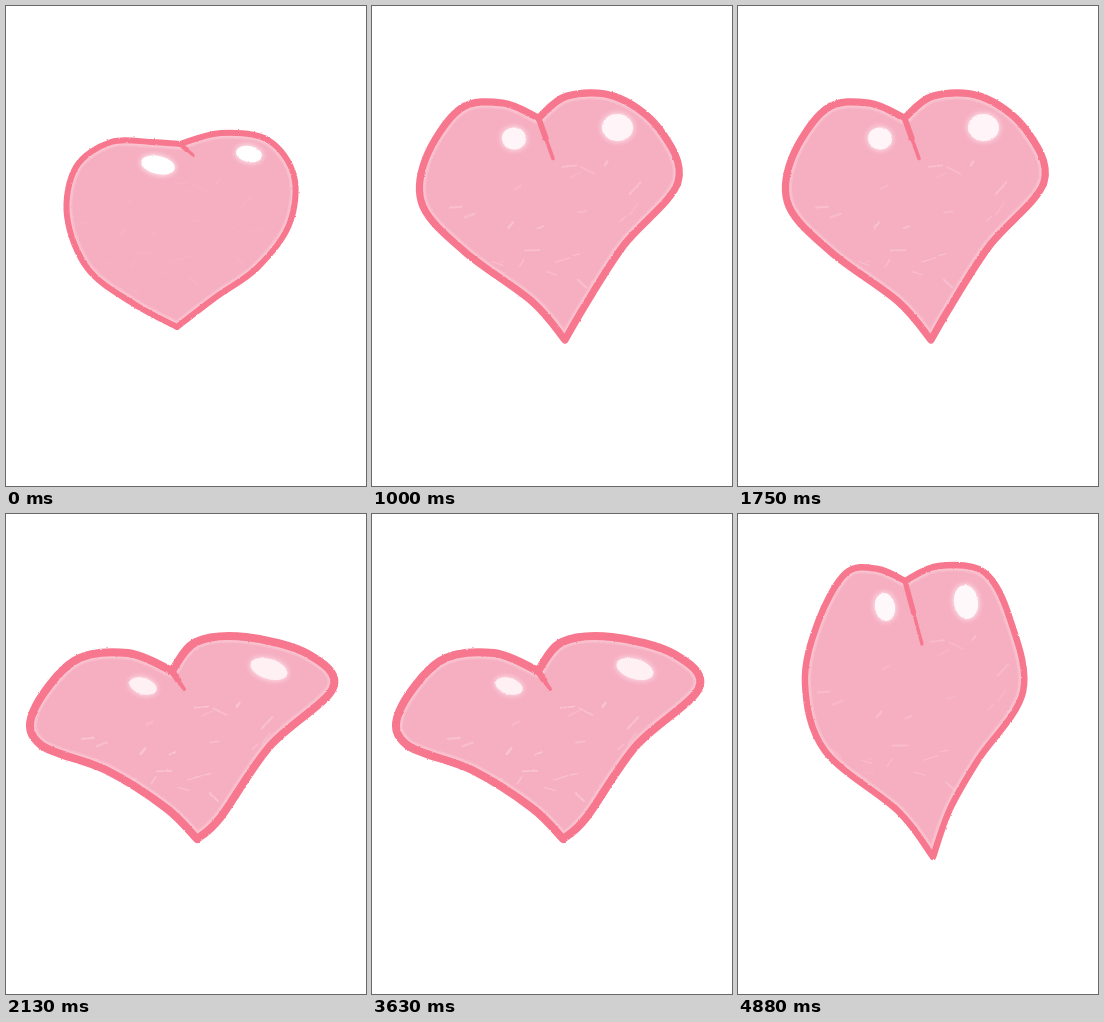
An HTML page with a canvas for the animation above (5000 ms loop, 360 px wide and 480 px high).

```html
<!DOCTYPE html>
<html lang="en">
<head>
<meta charset="utf-8">
<title>Beating heart</title>
<style>
  html, body { margin: 0; width: 100%; height: 100%; overflow: hidden; background: #fff; }
  canvas { display: block; filter: url(#crayon); }
  svg { position: absolute; }
</style>
</head>
<body>
<svg width="0" height="0">
  <filter id="crayon" x="0" y="0" width="1" height="1" color-interpolation-filters="sRGB">
    <feTurbulence type="fractalNoise" baseFrequency=".4" numOctaves="2" seed="4"/>
    <feDisplacementMap in="SourceGraphic" scale="2" xChannelSelector="R" yChannelSelector="G"/>
  </filter>
</svg>
<canvas width="360" height="480"></canvas>
<script>
const ctx = document.querySelector('canvas').getContext('2d');
const LINE = '#f7788e';

// Key points run clockwise: notch, right side, tip, left side.
// Each gleam is x, y, horizontal radius, vertical radius.
const round = {
  line: 6, notch: [174, 138], tip: [171, 321], crease: [187, 149],
  right: [[215, 127], [262, 134], [288, 170], [283, 219], [251, 262], [210, 291]],
  left: [[128, 298], [82, 263], [61, 210], [70, 161], [105, 136], [145, 136]],
  gleams: [[152, 159, 17, 9], [243, 148, 13, 8]], tilt: .2, tint: 255, streaks: .05
};
const wide = {
  line: 8, notch: [166, 157], tip: [191, 325], crease: [178, 175],
  right: [[190, 128], [240, 123], [302, 140], [327, 174], [264, 232], [214, 304]],
  left: [[160, 294], [100, 256], [35, 231], [27, 198], [68, 147], [122, 139]],
  gleams: [[137, 172, 14, 8], [263, 155, 19, 10]], tilt: .3, tint: 240, streaks: .3
};
const tall = {
  line: 6.5, notch: [167, 67], tip: [195, 343], crease: [184, 130],
  right: [[200, 52], [246, 58], [272, 105], [285, 178], [240, 246], [212, 295]],
  left: [[160, 297], [87, 237], [67, 170], [80, 108], [108, 59], [140, 55]],
  gleams: [[147, 93, 10, 14], [228, 88, 12, 17]], tilt: -.15, tint: 248, streaks: .2
};

function mix(a, b, k) {
  if (typeof a === 'number') return a + (b - a) * k;
  if (Array.isArray(a)) return a.map((v, i) => mix(v, b[i], k));
  return Object.fromEntries(Object.keys(a).map(key => [key, mix(a[key], b[key], k)]));
}

const middle = mix(wide, tall, .5);
const beat = [round, wide, middle, tall, middle, wide];

// Catmull-Rom spline through the points
function addCurve(path, pts) {
  for (let i = 0; i < pts.length - 1; i++) {
    const b = pts[i], c = pts[i + 1], a = pts[i - 1] || b, d = pts[i + 2] || c;
    path.bezierCurveTo(b[0] + (c[0] - a[0]) / 6, b[1] + (c[1] - a[1]) / 6,
      c[0] - (d[0] - b[0]) / 6, c[1] - (d[1] - b[1]) / 6, ...c);
  }
}

function stroke(color, width, path) {
  ctx.strokeStyle = color;
  ctx.lineWidth = width;
  ctx.stroke(path);
}

function segment(from, to) {
  const path = new Path2D();
  path.moveTo(...from);
  path.lineTo(...to);
  return path;
}

function seeded(seed) {
  return () => (seed = seed * 16807 % 2147483647) / 2147483647;
}

// Faint crayon strokes scattered around the middle of the heart
function drawStreaks({ notch, tip, streaks }) {
  const random = seeded(71), height = tip[1] - notch[1];
  for (let i = 0; i < 26; i++) {
    const x = tip[0] - 20 + (random() - .5) * 190;
    const y = notch[1] + height * (.2 + random() * .6);
    const length = 4 + random() * 12, angle = random() * 2 - 1.2;
    const end = [x + length * Math.cos(angle), y + length * Math.sin(angle)];
    stroke(`rgba(255,228,235,${streaks * (.4 + random())})`, 1 + random() * 2, segment([x, y], end));
  }
}

function draw(pose) {
  const { line, notch, tip, crease, tint } = pose;
  ctx.fillStyle = '#fff';
  ctx.fillRect(0, 0, 360, 480);
  ctx.lineCap = ctx.lineJoin = 'round';

  const outline = new Path2D();
  outline.moveTo(...notch);
  addCurve(outline, [notch, ...pose.right, tip]);
  addCurve(outline, [tip, ...pose.left, notch]);
  outline.closePath();

  ctx.save();
  ctx.clip(outline);
  ctx.fillStyle = '#f6aec1';
  ctx.fillRect(0, 0, 360, 480);
  for (const rim of [3, 6]) stroke('rgba(252,208,219,.35)', line + rim, outline);
  drawStreaks(pose);
  ctx.restore();

  stroke(LINE, line, outline);
  stroke(LINE, line * .8, segment(notch, mix(notch, crease, .5)));
  stroke(LINE, line * .5, segment(notch, crease));

  ctx.save();
  ctx.fillStyle = ctx.shadowColor = `rgb(255,${tint},${tint + (255 - tint) / 4})`;
  ctx.shadowBlur = 6;
  for (const [x, y, rx, ry] of pose.gleams) {
    ctx.beginPath();
    ctx.ellipse(x, y, rx, ry, pose.tilt, 0, 7);
    ctx.fill();
  }
  ctx.restore();
}

let start, shown = -1;
function tick(now) {
  start ??= now;
  const t = (now - start) % 5000;
  const step = Math.floor(t / 250) * 2 + (t % 250 >= 130);
  if (step !== shown) draw(beat[step % 6]);
  shown = step;
  requestAnimationFrame(tick);
}
draw(round);
requestAnimationFrame(tick);
</script>
</body>
</html>
```
